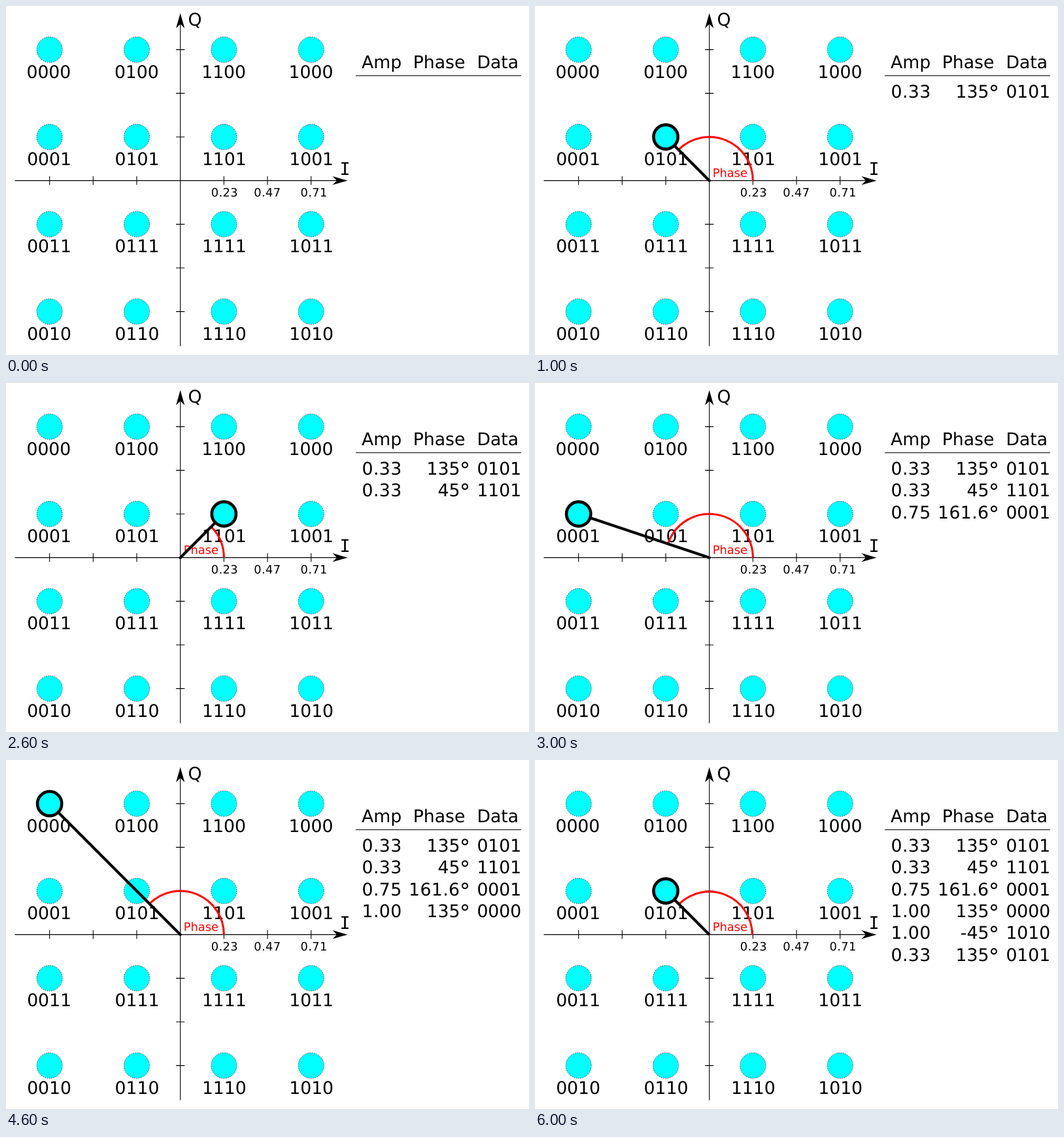
Write an HTML page that moves like this. It is 800x533 px and loops after 7000 ms.

```html
<!DOCTYPE html>
<html lang="en">
<head>
<meta charset="utf-8">
<title>16-QAM constellation</title>
<style>
  html, body { margin: 0; width: 100%; height: 100%; overflow: hidden; background: #fff; }
  svg { display: block; width: 800px; height: 533px; }
  text { font: 26.67px "DejaVu Sans", Verdana, sans-serif; text-rendering: geometricPrecision; }
  .small { font-size: 17.78px; }
  .mid { text-anchor: middle; }
  .end { text-anchor: end; }
  .decimal { letter-spacing: .4px; }
  .serif { font-family: "DejaVu Sans Mono", monospace; }
  .degree { font-size: 32px; }
  .axis { stroke: #000; stroke-width: 1.1; fill: none; }
  .dot { fill: #0ff; stroke: #000; stroke-width: .9; stroke-dasharray: 1.3 2; }
  .ring { fill: #0ff; stroke: #000; stroke-width: 4.6; }
  .ray { stroke: #000; stroke-width: 4.2; }
  .arc { stroke: #f00; stroke-width: 3; fill: none; }
  .pose { visibility: hidden; animation: pose 7s step-end infinite; }
  .cover { fill: #fff; animation: reveal 7s steps(7) infinite; }
  @keyframes pose {
    0% { visibility: visible; }
    14.2857%, 100% { visibility: hidden; }
  }
  @keyframes reveal {
    to { transform: translateY(233.333px); }
  }
</style>
</head>
<body>
<svg id="stage" viewBox="0 0 800 533"></svg>
<script>
const UNIT = 200 / 3, MID = 4 * UNIT;
const gray = ["00", "01", "11", "10"];
const offsets = [-3, -1, 1, 3];
// column, row, amplitude, phase
const symbols = [
  [1, 1, "0.33", "135"],
  [2, 1, "0.33", "45"],
  [0, 1, "0.75", "161.6"],
  [0, 0, "1.00", "135"],
  [3, 3, "1.00", "-45"],
  [1, 1, "0.33", "135"]
];

const text = (x, y, str, cls = "") => {
  const decimal = str.includes(".") ? " decimal" : "";
  return `<text x="${x}" y="${y}" class="${cls}${decimal}">${str}</text>`;
};
const circle = (x, y, r, cls) => `<circle cx="${x}" cy="${y}" r="${r}" class="${cls}"/>`;
const path = (d, cls = "") => `<path d="${d}" class="${cls}"/>`;
const at = i => MID + offsets[i] * UNIT;
const code = (col, row) => gray[col] + gray[row];

function drawAxes() {
  let d = `M13.5 ${MID}H508M${MID} 519.5V25`;
  for (const k of [-3, -2, -1, 1, 2, 3]) {
    const p = MID + k * UNIT;
    d += `M${p} 260v13.3M260 ${p}h13.3`;
  }
  return path(d, "axis") +
    path(`M522.5 ${MID}l-23 -6.6l6.6 6.6l-6.6 6.6z`) +
    path(`M${MID} 11l-6.6 23l6.6 -6.6l6.6 6.6z`) +
    text(278.5, 29.5, "Q") + text(518.5, 258, "I", "mid serif") +
    text(334.4, 291.3, "0.23", "small mid") +
    text(399.8, 291.3, "0.47", "small mid") +
    text(471.2, 291.3, "0.71", "small mid");
}

function drawPoints() {
  let out = "";
  for (let row = 0; row < 4; row++)
    for (let col = 0; col < 4; col++) {
      const x = at(col), y = at(row);
      const shift = (col ? .5 : -.6) - (row ? 0 : .7);
      out += circle(x, y, 19.5, "dot") +
        text(x + shift, y + 43.1, code(col, row), "mid");
    }
  return out;
}

function drawTable() {
  let out = "";
  symbols.forEach(([col, row, amp, phase], i) => {
    const y = 140 + i * UNIT / 2;
    out += text(544.6, y, amp) +
      text(694.4, y, phase, "end") +
      text(694, y + 4, "°", "degree") +
      text(720.4, y, code(col, row));
  });
  return out + `<rect class="cover" x="534" y="113.5" width="266" height="420"/>` +
    text(544, 95, "Amp") + text(622.8, 95, "Phase") + text(720.4, 95, "Data") +
    path("M535 106.5H788", "axis");
}

function drawPose([col, row, , phase], i) {
  const x = at(col), y = at(row);
  const a = phase * Math.PI / 180;
  const last = i === 5, down = a < 0;
  const r = last ? 65.6 : UNIT;
  const arc = `M${MID + r} ${MID}A${r} ${r} 0 0 ${down ? 1 : 0} ` +
    `${MID + r * Math.cos(a)} ${MID - r * Math.sin(a)}`;
  const cap = last || down ? "butt" : "round";
  return `<g class="pose" style="animation-delay:${i - 6}s">` +
    `<g fill="#f00">${text(271.8, 261, "Phase", "small")}</g>` +
    path(arc, "arc") +
    `<path class="ray" stroke-linecap="${cap}" d="M${MID} ${MID}L${x} ${y}"/>` +
    circle(x, y, 18.6, "ring") +
    (down ? `<circle cx="${MID}" cy="${MID}" r="4.6" fill="#0ff" stroke="#000"/>` : "") +
    `</g>`;
}

document.getElementById("stage").innerHTML =
  drawAxes() + drawPoints() + drawTable() + symbols.map(drawPose).join("");
</script>
</body>
</html>
```
